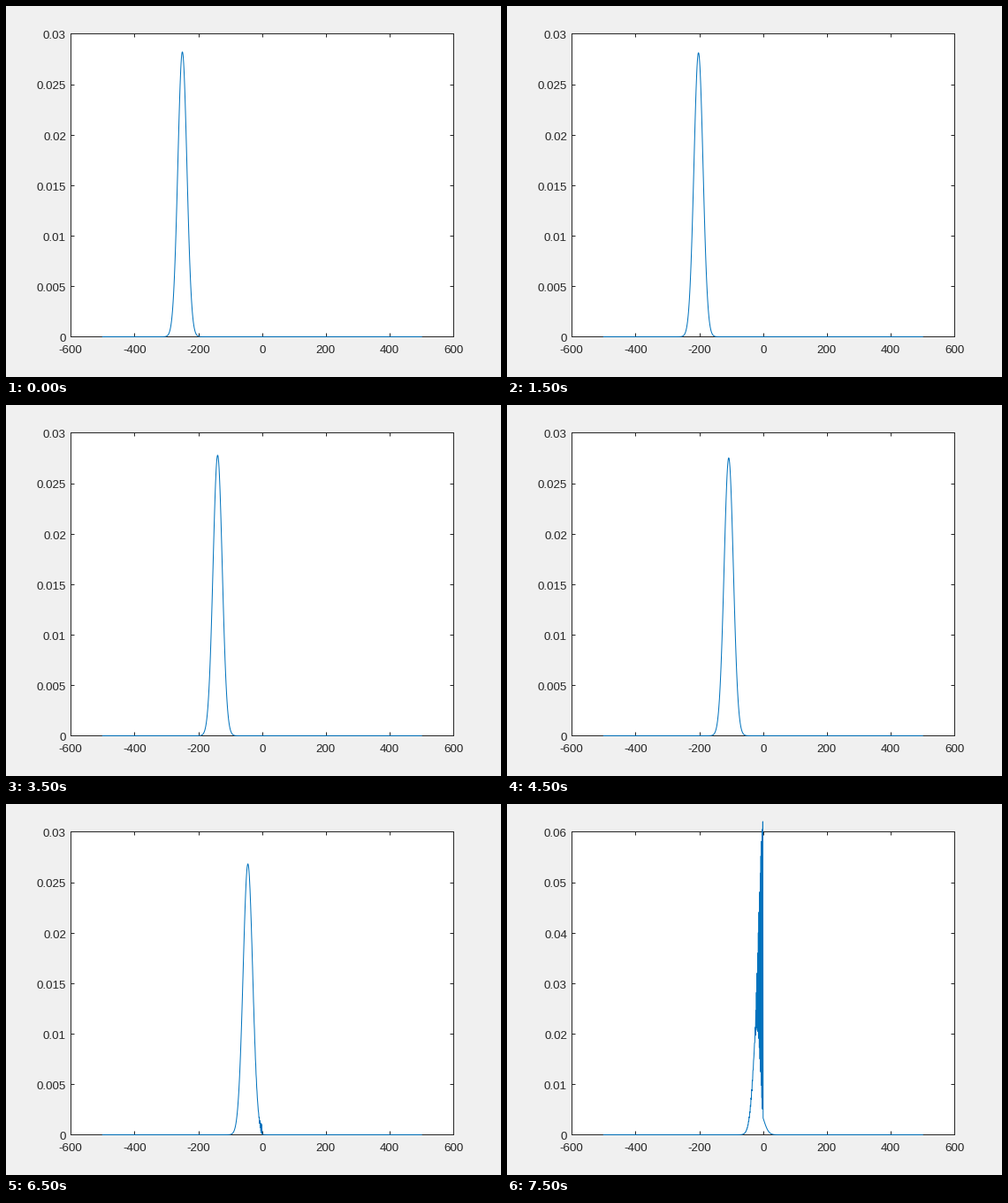
Animation of 560x420 px, one loop 8000 ms. Source, as a matplotlib script:

```python
import numpy as np
import matplotlib.pyplot as plt
from matplotlib.animation import FuncAnimation

W, H, DPI = 560, 420, 100
# just below half a pixel, so the box snaps to the pixel it lies in
LEFT, RIGHT, TOP, BOTTOM = 73.2, 506.3, 31.45, 374.45
FRAMES, INTERVAL = 16, 500
PX = 72 / DPI  # one pixel in points

# Gaussian wave packet meeting a thin barrier at x = 0
A, K0, X0 = 20, 1.58, -250
BARRIER, DT = 3.35, 10
x = np.arange(-500, 501)
k = np.linspace(K0 - 0.3, K0 + 0.3, 401)
packet = (A**2 / np.pi)**0.25 * np.exp(-(A * (k - K0))**2 / 2 - 1j * k * X0)
packet *= (k[1] - k[0]) / np.sqrt(2 * np.pi)
reflect = -1j * BARRIER / (k + 1j * BARRIER)
modes = np.exp(1j * np.outer(x, k)) + reflect * np.exp(1j * np.outer(abs(x), k))


def density(step):
    phase = np.exp(-0.5j * k**2 * step * DT)
    return abs(modes @ (packet * phase))**2


plt.rcParams.update({"font.family": "Liberation Sans", "path.simplify": False})
INK = "#262626"
fig = plt.figure(figsize=(W / DPI, H / DPI), dpi=DPI, facecolor="#f0f0f0")
ax = fig.add_axes([LEFT / W, 1 - BOTTOM / H, (RIGHT - LEFT) / W, (BOTTOM - TOP) / H])
ax.set_xlim(-600, 600)
ax.set_xticks(range(-600, 601, 200))
ax.tick_params(direction="in", top=True, right=True, length=4.3 * PX, width=PX,
               color=INK, labelbottom=False, labelleft=False)
for spine in ax.spines.values():
    spine.set(color=INK, linewidth=PX)


def label(px, py, text, ha):
    return fig.text(px / W, 1 - py / H, text, ha=ha, va="baseline",
                    size=13.4 * PX, color=INK)


for px, value in zip(np.linspace(LEFT, RIGHT, 7), range(-600, 601, 200)):
    label(px, 393, str(value), "center")
y_labels = [label(68, py + 5.8, "", "right") for py in np.linspace(BOTTOM, TOP, 7)]
curve, = ax.plot([], [], color="#0072bd", lw=PX, clip_on=False, zorder=5)


def draw(step):
    y = density(step)
    top = 0.03 if y.max() <= 0.03 else 0.06
    ticks = np.linspace(0, top, 7)
    ax.set_ylim(0, top)
    ax.set_yticks(ticks)
    for text, value in zip(y_labels, ticks):
        text.set_text(f"{value:g}")
    curve.set_data(x, y)
    return [curve, *y_labels]


anim = FuncAnimation(fig, draw, frames=FRAMES, interval=INTERVAL,
                     init_func=lambda: draw(0), repeat=True, repeat_delay=0)
plt.show()
```
